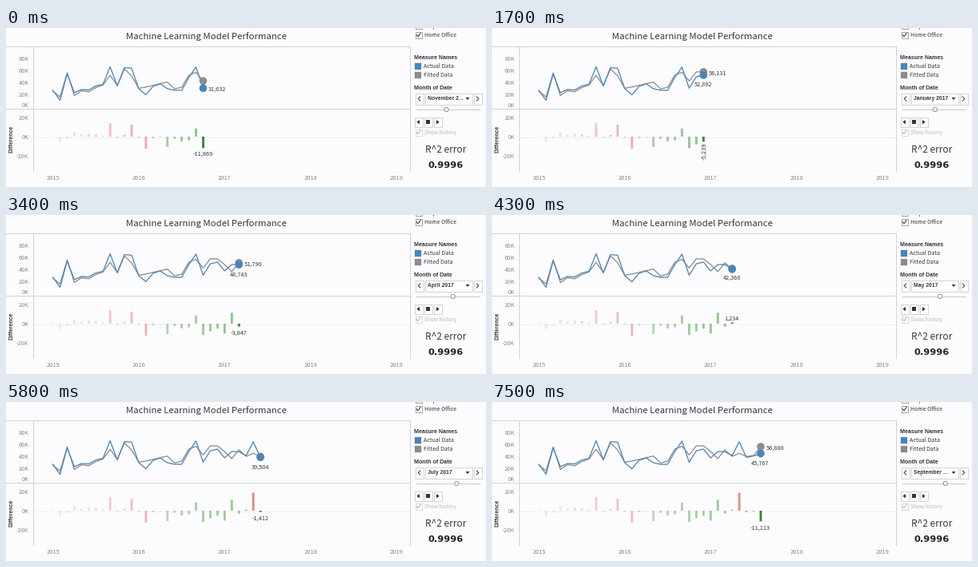
Write a matplotlib script that moves like this. It is 600x199 px and loops after 8 s.

```python
import matplotlib.pyplot as plt
from matplotlib.animation import FuncAnimation
from matplotlib.patches import Circle, Polygon, Rectangle

W, H, DPI = 600, 199, 100
BLUE, GRAY = "#4c85b9", "#8c8c8e"
BLUE_LINE, GRAY_LINE = "#5286b4", "#8d8d90"
INK, MUTED, RULE = "#383838", "#8a898b", "#d3d1d4"
SANS, BOLD, WIDE = "Noto Sans CJK JP", "Liberation Sans", "DejaVu Sans"

# Monthly values in thousands, starting January 2015
ACTUAL = [28.2, 12, 54.8, 24.3, 29.5, 28.8, 35.3, 37.9, 66.5, 35.3, 65, 64.2,
          30.8, 21, 34.7, 38.6, 30.8, 28.2, 28.2, 49, 66, 31.632, 50.214,
          52.892, 38.612, 48.908, 48.743, 42.368, 64.836, 39.504, 41.762, 45.767]
DIFF = [1.5, -5.5, -1.8, 4.5, 2, 3, 2.7, 1, 14, -0.8, 2, 12.5,
        -0.8, -12.5, -1.5, -0.4, -10.8, -2.2, -5, -3.8, 8.5, -11.869, -7.983,
        -5.239, -10.293, 11.436, -3.047, 1.234, 18.648, -1.412, -0.68, -11.113]
FITTED = [a - d for a, d in zip(ACTUAL, DIFF)]

FIRST = 21
STARTS = [100, 900, 1800, 2600, 3300, 4000, 4900, 5800, 6600, 7300]
STEP, LOOP = 100, 8000
MONTHS = ["November 2016", "December 2016", "January 2017", "February 2017",
          "March 2017", "April 2017", "May 2017", "June 2017", "July 2017",
          "August 2017", "September 2017"]


def px(i):
    return 58.6 + 8.945 * i


def value_y(v):
    return 68.9 - (v - 40) * 0.77


def diff_y(v):
    return 136 - 1.2 * v


def pt(pixels):
    return pixels * 72 / DPI


fig = plt.figure(figsize=(W / DPI, H / DPI), dpi=DPI, facecolor="#fcfbfd")
ax = fig.add_axes([0, 0, 1, 1])
ax.set_xlim(0, W)
ax.set_ylim(H, 0)
ax.axis("off")


def text(x, y, s, size, color=INK, ha="left", font=SANS, bold=False, **kw):
    """Place text with its capitals centred on y."""
    return ax.text(x, y + 0.365 * size, s, fontsize=pt(size), color=color, ha=ha,
                   va="baseline", family=font,
                   weight="bold" if bold else "normal", **kw)


def upright(x, y, s, size, font=SANS, bold=False):
    """Text that reads from bottom to top, centred on y."""
    return ax.text(x + 0.365 * size, y, s, fontsize=pt(size), color=INK,
                   rotation=90, rotation_mode="anchor", ha="center",
                   va="baseline", family=font, zorder=7,
                   weight="bold" if bold else "normal")


def line(xs, ys, color=RULE, width=1.0, **kw):
    return ax.plot(xs, ys, color=color, lw=pt(width), **kw)[0]


def box(x0, y0, x1, y1, face="white", edge="#c9c8ca", width=0.8):
    ax.add_patch(Rectangle((x0, y0), x1 - x0, y1 - y0, fc=face, ec=edge,
                           lw=pt(width)))


def shape(points, color="#333333"):
    ax.add_patch(Polygon(points, fc=color, ec="none"))


def checkbox(y, label, color, edge):
    box(511.5, y - 4, 519.5, y + 4, edge=edge)
    line([513.3, 515, 518], [y, y + 2, y - 2.2], color, 1.1)
    text(522.7, y, label, 7 if color == INK else 6.5, color)


def draw_chart():
    text(250.5, 10.3, "Machine Learning Model Performance", 11.4, ha="center")
    for y in (22.5, 100.5):
        line([0, 504.5], [y, y])
    for x in (33.5, 504.5):
        line([x, x], [22.5, 178.5])
    line([34, 504], [136.5, 136.5], "#efedf0", 0.8)
    for label, y in zip(("80K", "60K", "40K", "20K", "0K"), (38, 53.3, 68.3, 83, 96)):
        text(28.5, y, label, 7.3, MUTED, "right")
    for label, v in (("20K", 20), ("0K", 0), ("-20K", -20)):
        text(28.5, diff_y(v) + 0.3, label, 7.3, MUTED, "right")
    for k in range(5):
        text(px(12 * k), 187.5, str(2015 + k), 7.5, MUTED, "center")
    upright(5.5, 139, "Difference", 7, BOLD, True)


def draw_panel():
    checkbox(-2.8, "Corporate", INK, "#8f8f8f")
    checkbox(8.8, "Home Office", INK, "#8f8f8f")
    text(510, 36.5, "Measure Names", 7.2, font=BOLD, bold=True)
    for y, color, label in ((47.8, BLUE, "Actual Data"), (58.8, GRAY, "Fitted Data")):
        box(511.3, y - 4, 519.3, y + 4, color, color, 0.3)
        text(522, y, label, 7.1)
    text(510, 74.5, "Month of Date", 7.2, font=BOLD, bold=True)

    for x0, x1 in ((511.5, 521.5), (523.5, 582.5), (584.5, 594.5)):
        box(x0, 81.5, x1, 95.5)
    for x, d in ((516.5, 1.3), (589.5, -1.3)):
        line([x + d, x - d, x + d], [85.9, 88.5, 91.1], INK, 1)
    shape([(574.5, 87), (579.5, 87), (577, 90)])
    line([513, 592], [102, 102], "#d4d3d5", 1.4)

    for x in (510.5, 522.5, 534.5):
        box(x, 112, x + 10, 123.5)
    shape([(517, 115), (517, 120.4), (513.3, 117.7)])
    shape([(525, 115.2), (530, 115.2), (530, 120.2), (525, 120.2)])
    shape([(538, 115), (538, 120.4), (541.7, 117.7)])
    checkbox(130.7, "Show history", "#b9b8ba", "#cfced0")
    text(549.7, 152, "R^2 error", 11.9, ha="center")
    text(549.3, 171, "0.9996", 11.4, "#222222", "center", WIDE, True)


draw_chart()
draw_panel()

fitted_line = line([], [], GRAY_LINE, 1.3, solid_joinstyle="round", zorder=3)
actual_line = line([], [], BLUE_LINE, 1.3, solid_joinstyle="round", zorder=4)
fitted_dot = ax.add_patch(Circle((0, 0), 4.8, fc=GRAY, ec="none", zorder=5))
actual_dot = ax.add_patch(Circle((0, 0), 4.8, fc=BLUE, ec="none", zorder=6))
thumb = ax.add_patch(Circle((0, 0), 2.6, fc="white", ec="#8a8a8a",
                            lw=pt(0.9), zorder=5))
month = text(527, 88, "", 6.75, font=BOLD, bold=True)
bars = [ax.add_patch(Rectangle((px(i) - 1.4, 136), 2.9, diff_y(d) - 136,
                               ec="none", snap=False, zorder=3))
        for i, d in enumerate(DIFF)]
labels = []


def number(v):
    return f"{round(v * 1000):,}"


def tag(x, y, v, ha="center"):
    labels.append(text(x, y, number(v), 7.3, ha=ha, zorder=7))


def tag_points(i):
    x, a, f = px(i), ACTUAL[i], FITTED[i]
    if i == FIRST:
        tag(x + 6.8, value_y(a) + 0.8, a, "left")
    elif abs(a - f) < 1.5:
        tag(x - 0.3, value_y(a) + 11.3, a)
    else:
        tag(x + 6.6, value_y(max(a, f)) + 0.7, max(a, f), "left")
        tag(x - 0.6, value_y(min(a, f)) + 11.4, min(a, f))


def tag_bar(i):
    x, d = px(i), DIFF[i]
    if i in (22, 23):
        labels.append(upright(x + 0.6, diff_y(d) + 12, number(d), 7.5))
    else:
        tag(x - 0.4, diff_y(d) + (7.2 if d < 0 else -6), d)


def paint_bars(cur):
    for i, bar in enumerate(bars):
        big = abs(DIFF[i]) > 12
        bar.set_visible(i <= cur)
        if i == cur:
            bar.set(facecolor="#b42f31" if big else "#39843d", alpha=1)
        else:
            bar.set(facecolor="#cf5a55" if big else "#66ab60",
                    alpha=0.12 + 0.6 * min(i / cur, 1))


def update(frame):
    step = sum(frame * STEP >= t for t in STARTS)
    cur = FIRST + step
    xs = [px(i) for i in range(cur + 1)]
    for path, dot, data in ((fitted_line, fitted_dot, FITTED),
                            (actual_line, actual_dot, ACTUAL)):
        ys = [value_y(v) for v in data[:cur + 1]]
        path.set_data(xs, ys)
        dot.center = xs[-1], ys[-1]
    thumb.center = 550.5 + 1.62 * step, 102
    name = MONTHS[step]
    month.set_text(name[:10] + "..." if "ber" in name else name)
    paint_bars(cur)
    while labels:
        labels.pop().remove()
    tag_points(cur)
    tag_bar(cur)
    return []


anim = FuncAnimation(fig, update, frames=LOOP // STEP, interval=STEP,
                     init_func=lambda: update(0), repeat=True, repeat_delay=0)
plt.show()
```
